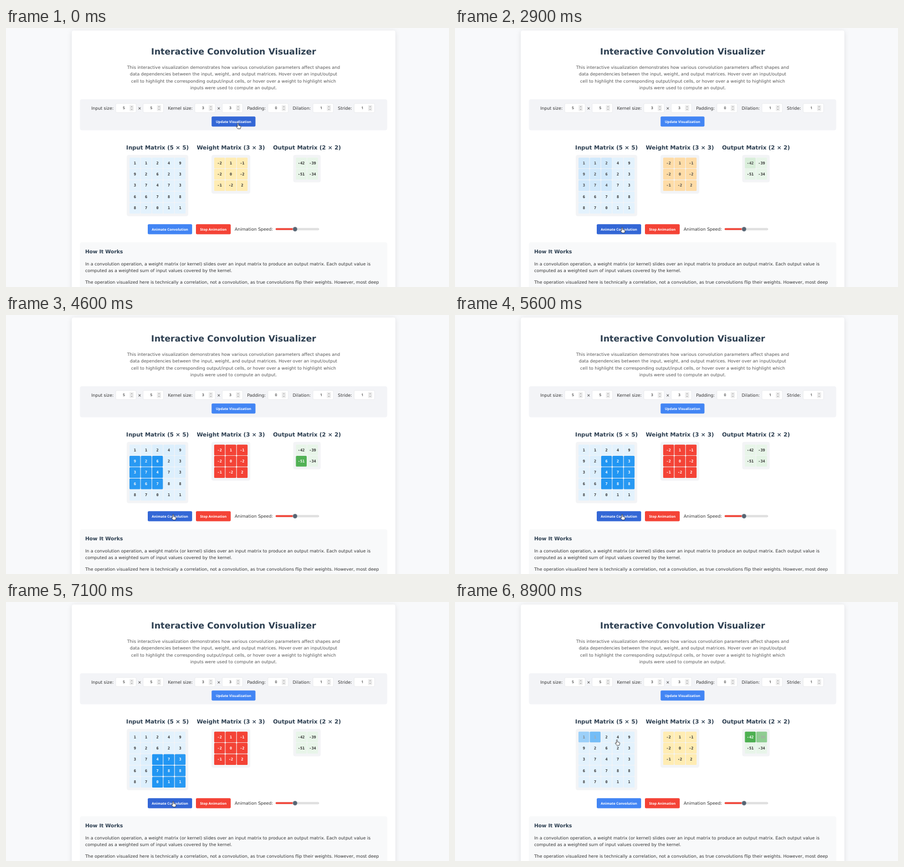
Animation, 800 px wide and 469 px high, one loop 9000 ms. Source, as an HTML page:

```html
<!DOCTYPE html>
<html lang="en">
<head>
<meta charset="utf-8">
<title>Interactive Convolution Visualizer</title>
<style>
html, body { margin: 0; width: 100%; height: 100%; overflow: hidden; background: #f8f9fb; }
svg { display: block; width: 800px; height: 469px; }
text { font: 7.79px "DejaVu Sans", sans-serif; fill: #333; text-rendering: geometricPrecision; white-space: pre; }
.mid { text-anchor: middle; }
.intro { fill: #555; }
.h1, .h2, .h3 { font-weight: bold; fill: #2c3e50; }
.h1 { font-size: 15.58px; }
.h2 { font-size: 10.13px; }
.h3 { font-size: 9.1px; }
.btn { font: bold 6.2px "Open Sans", "Noto Sans", sans-serif; fill: #fff; }
.num { font: 600 6.5px "Open Sans", "Noto Sans", sans-serif; }
.cell { font: bold 6.82px "DejaVu Sans Mono", monospace; }
.card { filter: drop-shadow(0 1px 4px rgba(0, 0, 0, .1)); }
</style>
</head>
<body>
<svg id="stage" viewBox="0 0 800 469"></svg>
<script>
const LOOP = 9000, TICK = 100, FADE = 300, LINE = 12.47;
const stage = document.getElementById('stage');
const targets = [];

function add(tag, attrs, content) {
  const el = document.createElementNS('http://www.w3.org/2000/svg', tag);
  for (const key in attrs) el.setAttribute(key, attrs[key]);
  if (content !== undefined) el.textContent = content;
  return stage.appendChild(el);
}
const box = (x, y, width, height, fill, rx = 0, more = {}) =>
  add('rect', { x, y, width, height, fill, rx, ...more });
const label = (x, y, content, cls = '') => add('text', { x, y, class: cls }, content);
const lines = (x, y, cls, rows) => rows.forEach((row, i) => label(x, y + i * LINE, row, cls));

// A part that fades between two colours while it is lit
function target(x, y, w, h, rx, base, lit) {
  const part = { x, y, w, h, base, lit, rect: box(x, y, w, h, '#fff', rx), toggles: [] };
  targets.push(part);
  return part;
}

// Page
box(118.8, 4.5, 584.4, 520, '#fff', 4, { class: 'card' });
label(411, 48, 'Interactive Convolution Visualizer', 'h1 mid');
lines(411, 73.8, 'intro mid', [
  'This interactive visualization demonstrates how various convolution parameters affect shapes and',
  'data dependencies between the input, weight, and output matrices. Hover over an input/output',
  'cell to highlight the corresponding output/input cells, or hover over a weight to highlight which',
  'inputs were used to compute an output.'
]);

// Parameter row, laid out from left to right
box(133.5, 129, 555, 56.3, '#f3f4f7', 4);
const FIELD = 37.4;
function field(x, value) {
  box(x + .25, 136.7, FIELD - .5, 16.3, '#fff', 2, { stroke: '#dcdfe3', 'stroke-width': .5 });
  label(x + 15, 147.3, value, 'num mid');
  box(x + 25.3, 139.8, 7.4, 10.4, '#ececec', .8);
  add('path', {
    d: `M${x + 27.6} 143.4l1.4-1.4 1.4 1.4M${x + 27.6} 146.6l1.4 1.4 1.4-1.4`,
    fill: 'none', stroke: '#777', 'stroke-width': .7
  });
}
let penX = 154;
const params = { 'Input size:': [5, 5], 'Kernel size:': [3, 3], 'Padding:': [0], 'Dilation:': [1], 'Stride:': [1] };
for (const [name, values] of Object.entries(params)) {
  penX += label(penX, 147.8, name).getComputedTextLength() + 3.6;
  values.forEach((value, i) => {
    if (i) {
      label(penX + 6, 147.8, '×', 'mid');
      penX += 12;
    }
    field(penX, value);
    penX += FIELD;
  });
  penX += 7.8;
}

// Buttons and slider
const BLUE = [66, 133, 244], DARK = [51, 103, 214], RED = [244, 67, 54];
function button(x, y, width, name, base, lit) {
  target(x, y, width, 18.2, 2, base, lit);
  label(x + width / 2, y + 11.3, name, 'btn mid');
}
button(371.3, 160.2, 79.2, 'Update Visualization', BLUE, DARK);
button(256, 355.3, 80.1, 'Animate Convolution', BLUE, DARK);
button(343, 355.3, 62.8, 'Stop Animation', RED, RED);
label(413, 366.9, 'Animation Speed:');
box(487, 362.8, 78, 2.9, '#e6e6e6', 1.4, { stroke: '#b8b8b8', 'stroke-width': .5 });
box(487, 362.6, 35, 3.2, '#f44336', 1.4);
add('circle', { cx: 522, cy: 364.2, r: 4.2, fill: '#566573', stroke: '#fff', 'stroke-width': .5 });

// Explanation
box(133.5, 388, 555, 100, '#f8f9fa', 4);
label(143, 407.5, 'How It Works', 'h3');
lines(143, 429.8, '', [
  'In a convolution operation, a weight matrix (or kernel) slides over an input matrix to produce an output matrix. Each output value is',
  'computed as a weighted sum of input values covered by the kernel.'
]);
label(143, 462.6, 'The operation visualized here is technically a correlation, not a convolution, as true convolutions flip their weights. However, most deep');

// Matrices
const PITCH = 20.45, SIZE = 19.48, PAD = 4.87, TOP = 229.8;
function matrix(cx, name, rows, base, lit) {
  const n = rows.length, side = n * PITCH - .97 + 2 * PAD, left = cx - side / 2;
  label(cx, 219.8, `${name} Matrix (${n} × ${n})`, 'h2 mid');
  box(left, TOP, side, side, '#f3f4f6', 4);
  return rows.map((row, r) => row.map((value, c) => {
    const x = left + PAD + c * PITCH, y = TOP + PAD + r * PITCH;
    const cell = target(x, y, SIZE, SIZE, 1.5, base, lit);
    cell.text = label(x + SIZE / 2, y + 11.9, value, 'cell mid');
    return Object.assign(cell, { name, r, c });
  }));
}
const grid = (n, fn) => Array.from({ length: n }, (_, r) => Array.from({ length: n }, (_, c) => fn(r, c)));
const data = ['11249', '92623', '37473', '66788', '87011'].map(row => [...row]);
const kernel = [[-2, 1, -1], [-2, 0, -2], [-1, -2, 2]];
const weigh = (r, c) => grid(3, (i, j) => kernel[i][j] * data[r + i][c + j]).flat().reduce((a, b) => a + b);

const input = matrix(273.6, 'Input', data, [227, 242, 253], [33, 150, 243]);
const weight = matrix(406.1, 'Weight', kernel, [255, 236, 179], RED);
const output = matrix(543.5, 'Output', grid(2, (r, c) => weigh(2 * r, 2 * c)), [232, 245, 233], [76, 175, 80]);
const outputAt = (r, c) => (output[r] || [])[c];

// Pointer: time, x, y, and the power that shapes the way there
const keys = [
  [0, 419, 172.5, 1], [200, 419, 172.5, 1], [800, 296, 384, 1], [1100, 291, 361, 1], [1400, 291, 361, 1],
  [1900, 302, 361, 1], [8100, 302, 361, 1], [8450, 232, 243, 1], [8900, 292.5, 249.5, 3]
];
function pointer(t) {
  const i = Math.max(1, keys.findIndex(key => key[0] >= t));
  const [t0, x0, y0] = keys[i - 1], [t1, x1, y1, power] = keys[i];
  const p = Math.max(0, (t - t0) / (t1 - t0)) ** power;
  return [x0 + (x1 - x0) * p, y0 + (y1 - y0) * p];
}
const hit = ([px, py]) =>
  targets.find(({ x, y, w, h }) => px >= x && px <= x + w && py >= y && py <= y + h);

// Which parts are lit; hover reacts a little after the pointer
const LAG = 85, START = 2870, STEP = 500;
function litAt(t) {
  const over = hit(pointer(t - LAG)), lit = new Set([over]);
  if (over && over.name === 'Input') grid(3, (i, j) => lit.add(outputAt(over.r - i, over.c - j)));
  if (over && over.name === 'Weight') {
    grid(3, (i, j) => lit.add(input[over.r + i][over.c + j]));
    output.flat().forEach(cell => lit.add(cell));
  }
  const step = Math.floor((t - START) / STEP);
  if (step >= 0 && step < 9) {
    const r = Math.floor(step / 3), c = step % 3;
    grid(3, (i, j) => lit.add(input[r + i][c + j]).add(weight[i][j]));
    lit.add(outputAt(r, c));
  }
  return lit;
}
for (let t = 0; t < LOOP; t += 5) {
  const lit = litAt(t);
  for (const part of targets) {
    const wasLit = part.toggles.length % 2 === 1;
    if (lit.has(part) !== wasLit) part.toggles.push(t || -FADE);
  }
}

// CSS "ease" curve
function ease(x) {
  if (x <= 0) return 0;
  if (x >= 1) return 1;
  let lo = 0, hi = 1;
  for (let i = 0; i < 20; i++) {
    const s = (lo + hi) / 2;
    if (.75 * s * (1 - s) + s ** 3 < x) lo = s; else hi = s;
  }
  return .3 * lo * (1 - lo) ** 2 + 3 * lo * lo * (1 - lo) + lo ** 3;
}
function level(toggles, t) {
  let from = 0, goal = 0, start = -LOOP;
  const at = time => from + (goal - from) * ease((time - start) / FADE);
  for (const time of toggles) {
    if (time > t) break;
    from = at(time);
    goal = 1 - goal;
    start = time;
  }
  return at(t);
}
const mix = (a, b, p) => `rgb(${a.map((v, i) => Math.round(v + (b[i] - v) * p))})`;

const hand = add('path', {
  d: 'M-1 .9a.95.95 0 0 1 1.9 0V4l3.2.7q1.1.3 1 1.5L4.6 8.6 4.2 10H-.4L-3 6.6q-.5-1 .5-1.2.7 0 1.5 1z',
  fill: '#fff', stroke: '#111', 'stroke-width': .7, 'stroke-linejoin': 'round'
});
const arrow = add('path', {
  d: 'M0 0V8.5L2 6.7 3.3 9.6 4.6 9 3.3 6.2H6z',
  fill: '#111', stroke: '#fff', 'stroke-width': .5
});

function draw(t) {
  for (const { rect, text, base, lit, toggles } of targets) {
    const p = level(toggles, t);
    rect.setAttribute('fill', mix(base, lit, p));
    if (text) text.style.fill = mix([51, 51, 51], [255, 255, 255], p);
  }
  const spot = pointer(t), shown = hit(spot) ? hand : arrow;
  for (const el of [hand, arrow]) {
    el.setAttribute('transform', `translate(${spot})`);
    el.setAttribute('visibility', el === shown ? 'visible' : 'hidden');
  }
}

const begin = performance.now();
function frame() {
  const t = (performance.now() - begin) % LOOP;
  draw(Math.floor(t / TICK) * TICK);
  requestAnimationFrame(frame);
}
frame();
</script>
</body>
</html>
```
